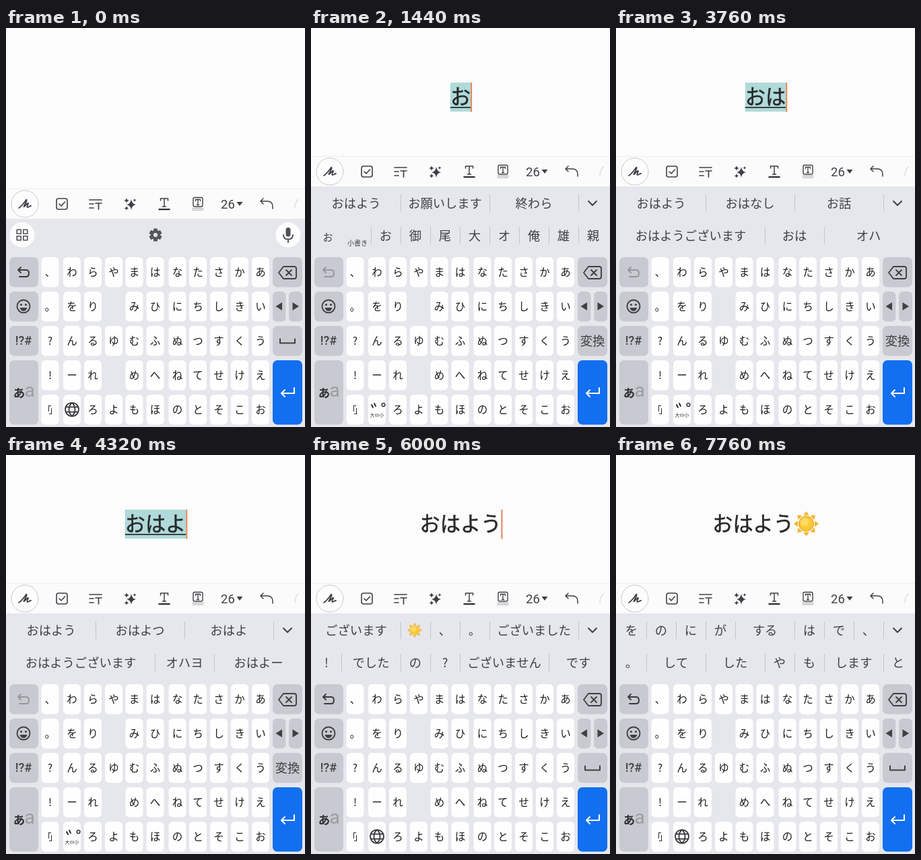
An HTML page with a canvas that plays this animation: 444 px wide and 592 px high, repeating every 8000 ms.

```html
<!DOCTYPE html>
<html lang="ja">
<head>
<meta charset="utf-8">
<style>
html, body { margin: 0; width: 100%; height: 100%; overflow: hidden; background: #fcfcfc; }
canvas { display: block; width: 444px; height: 592px; }
</style>
</head>
<body>
<canvas id="stage"></canvas>
<script>
const W = 444, H = 592, LOOP = 8000;
const canvas = document.getElementById('stage');
const ctx = canvas.getContext('2d');
const dpr = window.devicePixelRatio || 1;
canvas.width = W * dpr;
canvas.height = H * dpr;

const JP = '"Noto Sans CJK JP", "Noto Sans CJK", sans-serif';
const LATIN = 'Roboto, sans-serif';
const INK = '#3f4044', SIDE = '#c9cad1', PANEL = '#e6e7ed';

// Each stage: start, text, composing, then two rows of "word span" candidates.
const STAGES = [
  [0, '', false],
  [880, 'お', true, 'おはよう 3,お願いします 3,終わら 3',
    '* 2,お 1,御 1,尾 1,大 1,オ 1,俺 1,雄 1,親 1'],
  [3280, 'おは', true, 'おはよう 3,おはなし 3,お話 3', 'おはようございます 5,おは 2,オハ 3'],
  [4160, 'おはよ', true, 'おはよう 3,おはよつ 3,おはよ 3', 'おはようございます 5,オハヨ 2,おはよー 3'],
  [4880, 'おはよう', true, 'おはよう 5,お早う 4', 'おはようございます 6,オハヨウ 4'],
  [5840, 'おはよう', false, 'ございます 3,☀ 1,、 1,。 1,ございました 3',
    '! 1,でした 2,の 1,? 1,ございません 3,です 2'],
  [6880, 'おはよう☀', false, 'を 1,の 1,に 1,が 1,する 2,は 1,で 1,、 1',
    '。 1,して 2,した 2,や 1,も 1,します 2,と 1']
];
const TAPS = [[560, 880, 'お', 378, 507], [2880, 3280, 'は', 221, 303],
  [3840, 4160, 'よ', 160, 507], [4560, 4880, 'う', 378, 405]];
const PICKS = [[5760, 5840, 0, 5], [6560, 6880, 3, 1]];

const COLS = [65.5, 98, 129, 160, 190.5, 221.5, 254.5, 285, 316, 347, 378];
const ROWS = ['、わらやまはなたさかあ', '。をり みひにちしきい', '?んるゆむふぬつすくう',
  '!ーれ めへねてせけえ', '「 ろよもほのとそこお'];

function text(s, x, y, size, color = INK, weight = 400, font = JP, align = 'center') {
  ctx.font = `${weight} ${size}px ${font}`;
  ctx.textAlign = align;
  ctx.fillStyle = color;
  ctx.fillText(s, x, y + size * (font === JP ? 0.38 : 0.355));
}
function box(x, y, w, h, r, color) {
  ctx.beginPath();
  ctx.roundRect(x, y, w, h, r);
  ctx.fillStyle = color;
  ctx.fill();
}
function disc(x, y, r, color) {
  ctx.beginPath();
  ctx.arc(x, y, r, 0, Math.PI * 2);
  ctx.fillStyle = color;
  ctx.fill();
}
function stroke(path, x, y, width = 1.6, color = INK) {
  ctx.save();
  ctx.translate(x, y);
  ctx.lineWidth = width;
  ctx.lineCap = ctx.lineJoin = 'round';
  ctx.strokeStyle = color;
  ctx.stroke(new Path2D(path));
  ctx.restore();
}
function fill(path, x, y, color = INK) {
  ctx.save();
  ctx.translate(x, y);
  ctx.fillStyle = color;
  ctx.fill(new Path2D(path));
  ctx.restore();
}

function sun(x, y, r) {
  ctx.save();
  ctx.translate(x, y);
  ctx.fillStyle = '#f5b52c';
  for (let i = 0; i < 8; i++) {
    ctx.beginPath();
    ctx.moveTo(-r * 0.24, -r * 0.68);
    ctx.lineTo(0, -r);
    ctx.lineTo(r * 0.24, -r * 0.68);
    ctx.fill();
    ctx.rotate(Math.PI / 4);
  }
  disc(0, 0, r * 0.62, '#e9a31f');
  disc(0, 0, r * 0.56, '#fbc934');
  disc(-r * 0.12, -r * 0.14, r * 0.33, '#fdda62');
  ctx.restore();
}

function note(stage, t) {
  const [start, full, composing] = stage;
  if (!full) return;
  const word = full.replace('☀', '');
  const wide = word.length * 30.2;
  const total = wide + (full === word ? 0 : 36.8);
  const left = 222 - total / 2;
  if (composing) {
    ctx.fillStyle = '#b0dad9';
    ctx.fillRect(left, 81, wide, 43);
    ctx.fillStyle = '#26282a';
    ctx.fillRect(left, 117, wide, 1.7);
  }
  text(word, left, 102, 30.2, '#26282a', 500, JP, 'left');
  ctx.lineWidth = 0.5;
  ctx.strokeStyle = '#26282a';
  ctx.strokeText(word, left, 102 + 30.2 * 0.38);
  if (full !== word) sun(left + wide + 18.5, 102, 18.5);
  if ((t - start) % 1200 < 880) {
    ctx.fillStyle = '#e08558';
    ctx.fillRect(left + total, 81, 2, 43.5);
  }
}

function toolbar(y) {
  ctx.fillStyle = '#fbfbfb';
  ctx.fillRect(0, y - 23, W, 46);
  ctx.fillStyle = '#ededee';
  ctx.fillRect(0, y - 23, W, 1);
  disc(28, y, 20, '#fdfdfd');
  stroke('M20 0A20 20 0 1 1 -20 0A20 20 0 1 1 20 0', 28, y, 0.8, '#bcbcbf');
  stroke('M-9 6C-4 3 1 -5 2 -6C3 -7 3 -5 1 -1C-1 3 -3 6 0 3C3 0 5 -2 5 -1C5 1 2 5 4 5C6 5 7 3 9 3', 28, y, 1.8);
  stroke('M-5 -8H5Q8 -8 8 -5V5Q8 8 5 8H-5Q-8 8 -8 5V-5Q-8 -8 -5 -8M-4 0L-1 3L4.5 -3', 83, y);
  stroke('M-9 -6H9M-9 0H-3M-9 6H-3M0 -1H9M4.5 -1V8', 133, y, 1.7);
  fill('M2 -7Q3 0 9 1Q3 2 2 9Q1 2 -5 1Q1 0 2 -7M-5 -9Q-4.5 -5.5 -1 -5Q-4.5 -4.5 -5 -1Q-5.5 -4.5 -9 -5Q-5.5 -5.5 -5 -9M-5 3Q-4.5 6 -2 6.5Q-4.5 7 -5 9.5Q-5.5 7 -8.5 6.5Q-5.5 6 -5 3M7 -8Q7.4 -5.8 9.5 -5.5Q7.4 -5.2 7 -3Q6.6 -5.2 4.5 -5.5Q6.6 -5.8 7 -8', 184, y);
  stroke('M-5.5 -5V-8H5.5V-5M0 -8V4M-2.5 4H2.5', 235, y, 1.5);
  ctx.fillStyle = '#2b2c30';
  ctx.fillRect(226.5, y + 7, 17, 2.2);
  stroke('M-5 -9.5H5Q7 -9.5 7 -7.5V2Q7 4 5 4H-5Q-7 4 -7 2V-7.5Q-7 -9.5 -5 -9.5', 285, y, 1.4);
  stroke('M-3.5 -4.5V-6.5H3.5V-4.5M0 -6.5V1.5M-1.5 1.5H1.5', 285, y, 1.3);
  stroke('M-8 6.5H8M-8 9H8', 285, y, 0.8, '#8b8c90');
  text('26', 319, y, 18.5, INK, 400, LATIN, 'left');
  fill('M-4.5 -3H4.5L0 3Z', 347, y);
  stroke('M-5 -8L-9 -4L-5 0M-9 -4H1Q9 -4 9 4V7', 387, y, 1.5);
  stroke('M3 -7Q-2 -2 -2 6', 431, y, 1.2, '#dadadd');
}

function gear(x, y) {
  ctx.save();
  ctx.translate(x, y);
  for (let i = 0; i < 6; i++) {
    box(-3, -9.5, 6, 6, 1, '#55565b');
    ctx.rotate(Math.PI / 3);
  }
  disc(0, 0, 7.3, '#55565b');
  disc(0, 0, 3.1, PANEL);
  ctx.restore();
}

function tools() {
  disc(24, 307, 18.5, '#fdfdfe');
  for (const [x, y] of [[-4.8, -4.8], [4.8, -4.8], [-4.8, 4.8], [4.8, 4.8]]) {
    stroke('M-3 -3H3V3H-3Z', 24 + x, 307 + y, 1.6, '#505156');
  }
  gear(222, 307);
  disc(419, 307, 18.5, '#fdfdfe');
  box(415.5, 296, 7, 13.5, 3.5, '#505156');
  stroke('M-7 0Q-7 6.5 0 6.5Q7 6.5 7 0M0 7V11', 419, 307, 1.9, '#505156');
}

function candidates(line, y, pick) {
  let col = 0;
  line.split(',').forEach(item => {
    const [word, n] = item.split(' ');
    const x = 1 + col * 44, w = n * 44, mid = x + w / 2;
    const hit = pick && pick[2] === col;
    if (hit) box(x, y - 20, w + 1, 40, 7, '#cdced5');
    if (col && !hit && !(pick && pick[2] + pick[3] === col)) {
      ctx.fillStyle = '#c3c4ca';
      ctx.fillRect(x, y - 13, 1, 26);
    }
    if (word === '*') {
      text('お', 25, y + 2, 15);
      text('小書き', 69, y + 11, 10);
    } else if (word === '☀') sun(mid - 1, y, 11);
    else text(word, mid, y, 18.3);
    col += +n;
  });
}

function keys(composing) {
  ROWS.forEach((row, r) => {
    const y = 340 + r * 51;
    [...row].forEach((ch, c) => {
      const special = r === 4 && c < 2;
      if (ch === ' ' && !special) return;
      box(COLS[c] - 13, y, 26, 44.5, 6, '#fefefe');
      if (!special) text(ch, COLS[c], y + 22.5, 15.5, '#1b1c1f');
    });
  });
  text('「', 61, 566, 13, '#1b1c1f');
  text('」', 70, 566, 13, '#1b1c1f');
  if (composing) {
    stroke('M-6 -7L-4 -3M-2 -9L0 -5', 96, 566, 1.8, '#222');
    stroke('M2.4 0A2.4 2.4 0 1 1 -2.4 0A2.4 2.4 0 1 1 2.4 0', 107.5, 559, 1.4, '#222');
    text('大⇔小', 98, 574, 7, '#333');
  } else {
    stroke('M10 0A10 10 0 1 1 -10 0A10 10 0 1 1 10 0M-9 -3.6H9M-9 3.6H9M0 -10C-6 -5 -6 5 0 10C6 5 6 -5 0 -10', 98, 566, 1.7, '#333438');
  }

  for (let r = 0; r < 3; r++) box(5, 340 + r * 51, 43, 44.5, 7, SIDE);
  box(5, 493, 43, 95.5, 7, SIDE);
  stroke('M-4 -8L-8 -4L-4 0M-8 -4H4Q8 -4 8 1Q8 6 4 6H-6', 26, 363, 2, composing ? '#96979d' : '#3a3b40');
  stroke('M9.5 0A9.5 9.5 0 1 1 -9.5 0A9.5 9.5 0 1 1 9.5 0', 26, 413, 1.9);
  disc(22.5, 410.5, 1.6, INK);
  disc(29.5, 410.5, 1.6, INK);
  fill('M-5.5 2H5.5Q4 7 0 7Q-4 7 -5.5 2', 26, 413);
  text('!?#', 26, 464, 18, INK, 500, LATIN);
  text('あ', 19.5, 541, 17.5, '#2d2e32', 700);
  text('a', 35, 537.5, 28, '#9c9da3', 400, LATIN);

  box(396, 340, 44, 44.5, 7, SIDE);
  box(396, 391, 19.5, 44.5, 6, SIDE);
  box(420, 391, 20, 44.5, 6, SIDE);
  box(396, 442, 44, 44.5, 7, SIDE);
  box(396, 493, 44, 95.5, 7, '#116ff0');
  stroke('M-13 0L-6 -9H10Q13 -9 13 -6V6Q13 9 10 9H-6ZM-2 -4L6 4M6 -4L-2 4', 418, 363, 1.9);
  fill('M4.5 -6V6L-5 0Z', 405.5, 413);
  fill('M-4.5 -6V6L5 0Z', 430, 413);
  if (composing) text('変換', 418, 464, 18.3);
  else stroke('M-11 -3V3H11V-3', 418, 464.5, 2);
  stroke('M10 -7V1H-9M-4 -4L-9 1L-4 6', 418, 541, 2, '#fff');
}

function bubble([, , ch, x, y]) {
  ctx.save();
  ctx.shadowColor = 'rgba(60,60,80,.25)';
  ctx.shadowBlur = 3 * dpr;
  disc(x, y, 31, '#cfd0d6');
  ctx.restore();
  text(ch, x, y, 30, '#0c0c0e');
  for (let i = -1; i < 2; i++) disc(x + i * 4, y + 22.5, 1.3, '#1b1c1f');
}

function draw(t) {
  const active = list => list.find(e => t >= e[0] && t < e[1]);
  const stage = STAGES.filter(s => t >= s[0]).pop();
  const up = t >= 880;
  ctx.setTransform(dpr, 0, 0, dpr, 0, 0);
  ctx.fillStyle = '#fcfcfc';
  ctx.fillRect(0, 0, W, H);
  note(stage, t);
  toolbar(up ? 213 : 261);
  ctx.fillStyle = PANEL;
  ctx.fillRect(0, up ? 235 : 283, W, H);
  if (up) {
    candidates(stage[3], 260, active(PICKS));
    candidates(stage[4], 308);
    ctx.fillStyle = '#c3c4ca';
    ctx.fillRect(397, 247, 1, 26);
    stroke('M-6 -3L0 3L6 -3', 418, 260, 2);
  } else tools();
  keys(stage[2]);
  const tap = active(TAPS);
  if (tap) bubble(tap);
}

function tick() {
  draw(performance.now() % LOOP);
  requestAnimationFrame(tick);
}
tick();
</script>
</body>
</html>
```
